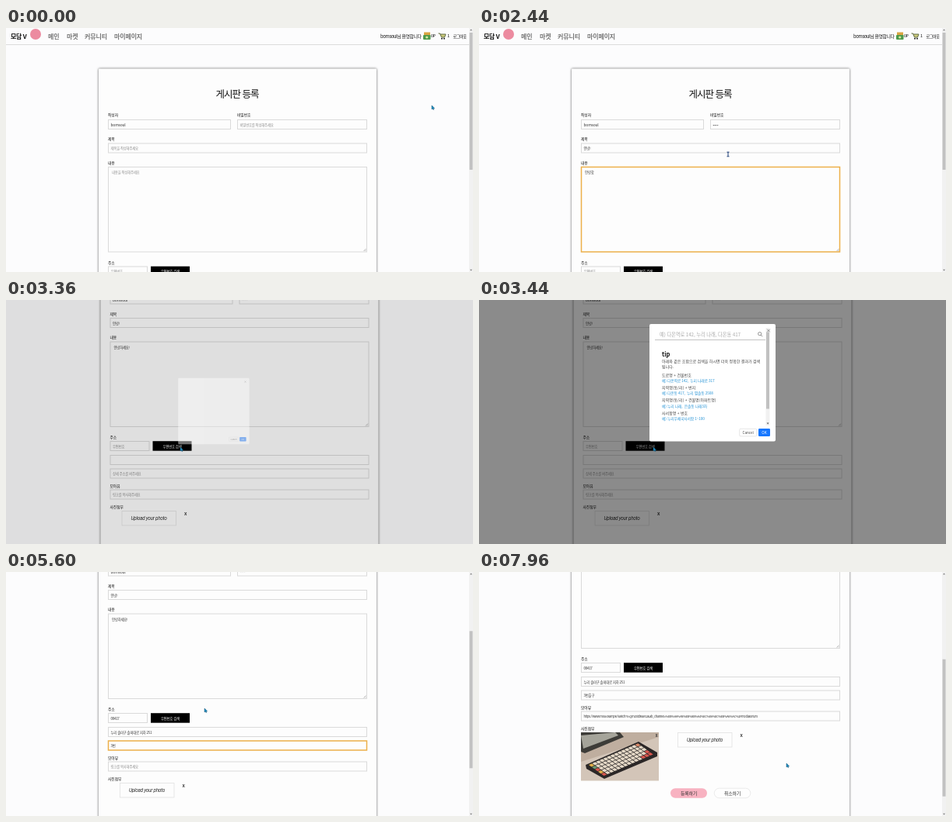
Write an HTML page that moves like this. It is 600 px wide and 315 px high and loops after 8000 ms.

```html
<!DOCTYPE html>
<html lang="ko">
<head>
<meta charset="utf-8">
<title>게시판 등록</title>
<style>
html, body { margin: 0; width: 100%; height: 100%; overflow: hidden; background: #fcfcfd; }
svg { display: block; width: 600px; height: 315px; }
text {
  font-family: "Noto Sans CJK KR", "Noto Sans CJK JP", "Noto Sans", sans-serif;
  font-size: 4.4px; letter-spacing: -.22px; fill: #333;
  dominant-baseline: central; white-space: pre;
}
.nav text { font-size: 8px; font-weight: 700; letter-spacing: -.15px; fill: #777; }
.nav .brand { fill: #111; letter-spacing: -.4px; }
.user text { font-size: 5.4px; fill: #111; letter-spacing: -.5px; }
.label text { font-size: 4.8px; font-weight: 500; letter-spacing: -.05px; fill: #111; }
.field { fill: #fdfdfd; stroke: #dadada; stroke-width: 1; }
.field.focus { stroke: #edb04a; stroke-width: 1.5; }
text.hint { fill: #8f8f8f; }
.mid { text-anchor: middle; }
#pass:not(.hint) { letter-spacing: .3px; }
#link:not(.hint) { font-size: 4px; letter-spacing: -.32px; }
#card { fill: #fdfdfd; filter: drop-shadow(0 0 1.6px #555); }
#modal text { font-size: 5px; letter-spacing: 0; fill: #444; }
#modal .blue { font-size: 4.8px; letter-spacing: -.15px; fill: #2a95d6; }
#modal .search { font-size: 6.3px; letter-spacing: -.1px; }
#modal .red { font-size: 5.6px; letter-spacing: -.1px; fill: #f0455a; }
#modal .small { font-size: 4.1px; fill: #888; }
#modal .row { letter-spacing: -.12px; }
#modal .tag { font-size: 3.6px; fill: #3a9bd8; letter-spacing: -.1px; }
.link { text-decoration: underline; fill: #2a95d6; }
.tagbox { fill: none; stroke: #b9dcf0; stroke-width: .5; }
.rule { stroke: #e2e2e2; stroke-width: .6; }
.off { display: none; }
</style>
</head>
<body>
<svg viewBox="0 0 600 315">
  <rect width="600" height="315" fill="#fcfcfd"/>

  <g id="page">
    <path d="M-5 21.5H605" stroke="#dcdcdc"/>
    <g class="nav">
      <text class="brand" x="6" y="10">모담 V</text>
      <circle cx="38" cy="8" r="7" fill="#ec8ba0"/>
      <text x="54" y="10">메인</text>
      <text x="78" y="10">마켓</text>
      <text x="101" y="10">커뮤니티</text>
      <text x="139" y="10">마이페이지</text>
    </g>
    <g class="user">
      <text x="481" y="10" style="font-size:6px">bomsoul님 환영합니다</text>
      <rect x="537" y="5.5" width="8" height="4" fill="#d9a441"/>
      <rect x="536" y="9" width="9.5" height="6" rx="1" fill="#4f9a4b"/>
      <circle cx="540.7" cy="12" r="1.6" fill="#d8e8a0"/>
      <text x="546" y="10">0P</text>
      <path d="M555.5 7h2l2 5h4l1.5-4h-7" fill="#c9c77a" stroke="#55633a" stroke-width=".9"/>
      <circle cx="560" cy="13.7" r=".9"/><circle cx="563" cy="13.7" r=".9"/>
      <text x="567" y="10">1</text>
      <text x="574.5" y="10" style="font-size:5.2px">로그아웃</text>
    </g>

    <rect id="card" x="119" y="52.5" width="357" height="520" rx="1"/>
    <text class="mid" x="297" y="84" style="font-size:12.5px;letter-spacing:-1px;fill:#111">게시판 등록</text>

    <g class="label">
      <text x="131" y="111.5">작성자</text>
      <text x="297" y="111.5">비밀번호</text>
      <text x="131" y="142.5">제목</text>
      <text x="131" y="173">내용</text>
      <text x="131" y="302">주소</text>
      <text x="131" y="364.5">모아뷰</text>
      <text x="131" y="392">사진첨부</text>
    </g>

    <rect class="field" x="131.5" y="118.5" width="157" height="12"/>
    <text x="134.5" y="124.5" style="font-size:5px">bomsoul</text>
    <rect class="field" x="297.5" y="118.5" width="166" height="12"/>
    <text id="pass" x="300.5" y="124.5"></text>
    <rect class="field" id="titleBox" x="131.5" y="149" width="332" height="12"/>
    <text id="subject" x="134.5" y="155"></text>
    <rect class="field" id="bodyBox" x="131.5" y="179.5" width="332" height="109.5"/>
    <path d="M459.5 288l3-3M461.3 288l1.2-1.2" stroke="#777" stroke-width=".5"/>
    <text id="content" x="136" y="186"></text>

    <rect class="field" x="131.5" y="308" width="50" height="12"/>
    <text id="zip" x="134.5" y="314"></text>
    <rect x="186" y="307.7" width="50" height="12.5"/>
    <text class="mid" x="211" y="314" style="fill:#fff">우편번호 검색</text>
    <rect class="field" x="131.5" y="326" width="332" height="12"/>
    <text id="address" x="134.5" y="332"></text>
    <rect class="field" id="detailBox" x="131.5" y="343.5" width="332" height="12"/>
    <text id="detail" x="134.5" y="349.5"></text>
    <rect class="field" id="linkBox" x="131.5" y="370.5" width="332" height="12"/>
    <text id="link" x="134.5" y="376.5"></text>

    <g id="photo">
      <svg x="131" y="397.5" width="100" height="62.5" viewBox="0 0 100 62.5">
        <rect width="100" height="62.5" fill="#bfae9f"/>
        <path d="M0 38L100 6V62.5H0z" fill="#d3c5b8"/>
        <path d="M0 0H50L55 6L5 27L0 25z" fill="#3d3c38"/>
        <path d="M0 4L44 0L48 4L3 21z" fill="#a5a49a"/>
        <path d="M6 42L74 12L98 26V31L30 60L7 47z" fill="#2b2727"/>
        <g id="keys" transform="matrix(64 -28 20 14.5 10 42)"></g>
      </svg>
      <text class="mid" x="228" y="401.5" style="font-weight:700">X</text>
    </g>
    <g id="upload">
      <rect id="uploadBox" x="146.5" y="398" width="69.5" height="18.5" stroke="#e2e2e2" stroke-width=".8"/>
      <text id="uploadText" class="mid" x="181" y="407.3" style="font:italic 6.5px Roboto,sans-serif;letter-spacing:-.3px">Upload your photo</text>
      <text class="mid" x="228" y="401.5" style="font-weight:700;font-size:5.4px">X</text>
    </g>
    <rect x="246" y="469.7" width="47" height="12.5" rx="6.2" fill="#f8b2c1"/>
    <rect x="302.3" y="469.7" width="46.5" height="12.5" rx="6.2" fill="#fefefe" stroke="#e2e2e2" stroke-width=".7"/>
    <text class="mid" x="269.5" y="475.7" style="font-size:6px">등록하기</text>
    <text class="mid" x="325.5" y="475.7" style="font-size:6px">취소하기</text>
  </g>

  <g id="bar">
    <rect x="595" width="5" height="315" fill="#f1f1f1"/>
    <path d="M596 3.3l1.5-1.8 1.5 1.8zM596 311.7l1.5 1.8 1.5-1.8z" fill="#777"/>
    <rect id="thumb" x="595.5" width="4" height="177" fill="#c1c1c1"/>
  </g>

  <rect id="mask" width="600" height="315"/>

  <g id="modal">
    <rect x="219" y="31" width="162" height="151.5" rx="2" fill="#fff"/>
    <g id="frame">
      <rect x="368.5" y="36" width="5" height="126" fill="#f1f1f1"/>
      <path d="M369.7 158.6l1.4 1.8 1.4-1.8z" fill="#555"/>
      <rect id="innerThumb" x="369" y="41.5" width="4" fill="#c1c1c1"/>
      <text id="query" class="search" x="232" y="44.3"></text>
      <g fill="none" stroke="#777" stroke-width=".8">
        <circle cx="360.7" cy="43.6" r="2.1"/><path d="M362.2 45.2l2 2"/>
      </g>
      <path d="M226 51.5H368" stroke="#aaa" stroke-width=".7"/>

      <g id="tips">
        <text x="235" y="69" style="font-size:7.5px;font-weight:700;fill:#111">tip</text>
        <text x="235" y="78">아래와 같은 조합으로 검색을 하시면 더욱 정확한 결과가 검색</text>
        <text x="235" y="85">됩니다.</text>
        <text x="235" y="96">도로명 + 건물번호</text>
        <text class="blue" x="235" y="103.5">예) 다온역로 142,  누리 나래로 317</text>
        <text x="235" y="112.3">지역명(동/리) + 번지</text>
        <text class="blue" x="235" y="119.8">예) 다온동 417,  누리 별솔동 2508</text>
        <text x="235" y="128.5">지역명(동/리) + 건물명(아파트명)</text>
        <text class="blue" x="235" y="136">예) 누리 나래,  은솔동 나래3차</text>
        <text x="235" y="145">사서함명 + 번호</text>
        <text class="blue" x="235" y="152.7">예) 누리우체국사서함 1~100</text>
      </g>

      <g id="results">
        <path d="M350.8 42.2l3.4 3.4m0-3.4l-3.4 3.4" stroke="#555" stroke-width=".7"/>
        <text x="230.5" y="59" style="letter-spacing:-.22px"><tspan font-weight="700">검색결과가 많습니다.</tspan> 검색어에 아래와 같은 조합을 이용하시면 더욱 정확</text>
        <text x="230.5" y="66" style="letter-spacing:-.22px">한 결과가 검색됩니다.  <tspan class="link">도로명+건물번호</tspan>,  <tspan class="link">지역명+지번</tspan>,  <tspan class="link">지역명+건물</tspan></text>
        <text x="230.5" y="73" style="letter-spacing:-.22px"><tspan class="link">명(아파트명)</tspan>,  <tspan class="link">사서함명+번호</tspan></text>
        <rect x="226" y="79" width="142" height="83" fill="#e6e6e8"/>
        <rect x="230" y="83" width="135" height="79" fill="#fff"/>
        <text x="234" y="90">도로명 전체</text>
        <text x="267" y="90">지역명 전체</text>
        <path d="M259.5 94h2.4l-1.2 1.6zM292.3 94h2.4l-1.2 1.6z" fill="#333"/>
        <path class="rule" d="M230 97.5H365M230 141H365"/>
        <text class="red" x="234" y="105.5">00583</text>
        <text class="small" x="331" y="106">영문보기  |  지도</text>
        <rect class="tagbox" x="233.5" y="110.5" width="12" height="5.6"/>
        <text class="tag" x="234.7" y="113.3">도로명</text>
        <text class="row" x="248" y="113.5">누리 솔미구 솔미대로 714 (솔미역 라온빌)</text>
        <rect class="tagbox" x="233.5" y="119.2" width="12" height="5.6"/>
        <text class="tag" x="236.2" y="122">지번</text>
        <text class="row" x="248" y="122.2">누리 솔미구 별솔동 605-8</text>
        <text class="small" x="248" y="131.5">+  이 지번주소 8건</text>
        <rect x="281" y="129" width="14" height="5" rx="2.5" fill="#888"/>
        <text x="283" y="131.5" style="font-size:3.6px;fill:#fff">더보기</text>
        <text class="red" x="234" y="149.5">00417</text>
        <text class="small" x="331" y="150">영문보기  |  지도</text>
        <rect class="tagbox" x="233.5" y="154.2" width="12" height="5.6"/>
        <text class="tag" x="234.7" y="157">도로명</text>
        <text class="row" x="248" y="157.2">누리 솔미구 솔미대로 지하 251 (솔미역)</text>
      </g>
    </g>
    <path d="M370.2 37.7l3.6 3.6m0-3.6l-3.6 3.6" stroke="#666" stroke-width=".7"/>
    <rect x="334.7" y="166.3" width="22" height="9.6" rx="1.3" fill="#fff" stroke="#d5d5d5" stroke-width=".6"/>
    <text class="mid" x="345.7" y="171" style="font-size:4.6px">Cancel</text>
    <rect x="359" y="166" width="15" height="10" rx="1.3" fill="#1677ff"/>
    <text class="mid" x="366.5" y="171" style="font-size:4.6px;fill:#fff">OK</text>
  </g>

  <g id="cursor">
    <path id="arrow" d="M0 0V5L1.2 4L2 5.6L2.9 5.1L2.2 3.7L3.6 3.5z" fill="#1b8fc4" stroke="#1d5574" stroke-width=".5"/>
    <path id="beam" d="M-1.5-2.8H1.5M0-2.8V2.8M-1.5 2.8H1.5" fill="none" stroke="#1e3f78" stroke-width="1"/>
    <path id="hand" d="M-.8 0Q0-1 .8 0V2.4L3.6 3.2V5.6L2.6 7.4H-.8L-2.6 4.4L-.8 4.6z" fill="#1583b5" stroke="#173a52" stroke-width=".6"/>
  </g>
</svg>

<script>
const LOOP = 8000;
const $ = id => document.getElementById(id);
const within = (t, a, b) => t >= a && t < b;
const clamp = v => Math.min(1, Math.max(0, v));
const show = (id, on) => $(id).classList.toggle('off', !on);

// keys: [time, ...values]; eased between neighbours
function track(keys, t) {
  let i = keys.findIndex(k => k[0] > t);
  if (i < 0) return keys.at(-1).slice(1);
  if (i === 0) return keys[0].slice(1);
  const [a, b] = [keys[i - 1], keys[i]];
  const p = (t - a[0]) / (b[0] - a[0]);
  const e = p * p * (3 - 2 * p);
  return a.slice(1).map((v, n) => v + (b[n + 1] - v) * e);
}

// Evenly spaced key strokes from start to end
const strokes = (start, end, words) => {
  const list = words.split(' ');
  return list.map((w, i) => [start + (end - start) * i / Math.max(1, list.length - 1), w]);
};
const typed = (keys, t) => keys.reduce((text, [at, w]) => t >= at ? w : text, '');

const pointer = [
  [40, 547, 100], [280, 320, 127], [840, 320, 127], [1220, 320, 163],
  [3000, 320, 163], [3240, 224, 190], [3450, 224, 190], [3640, 258, 44],
  [4600, 258, 44], [4960, 260, 169], [5060, 260, 169], [5140, 262, 157],
  [5190, 262, 157], [5320, 240, 222], [5400, 255, 176], [6080, 255, 176],
  [6240, 250, 251], [6400, 250, 251], [6600, 190, 278], [6900, 190, 278],
  [7240, 370, 40], [7440, 370, 44], [7720, 340, 200], [7920, 395, 247]
];
const scroll = [[2920, 0], [3120, 125.5], [7780, 125.5], [7940, 190.5]];
const OPEN = 3333, CLOSE = 5190, FADE = 107;

const fields = {
  pass: [strokes(520, 760, '• •• ••• ••••'), '비밀번호를 작성해주세요'],
  subject: [strokes(1400, 1720, 'ㅇ 아 안 안ㄴ 안녀 안녕 안녕!'), '제목을 작성해주세요'],
  content: [[...strokes(1840, 2200, 'ㅇ 아 안 안ㄴ 안녀 안녕'),
    ...strokes(2260, 2600, '안녕ㅎ 안녕하 안녕핫 안녕하세 안녕하셍 안녕하세요'),
    [2760, '안녕하세요!']], '내용을 작성해주세요'],
  zip: [[[CLOSE, '00417']], '우편번호'],
  address: [[[CLOSE, '누리 솔미구 솔미대로 지하 251']], ''],
  detail: [[...strokes(5480, 5600, '3 3ㅂ 3번'),
    ...strokes(5760, 5920, '3번추 3번출 3번출ㄱ 3번출구')], '상세 주소를 써주세요'],
  link: [[[6340, 'https://www.moa.example/watch?v=QmZ4tdRavo2&ab_channel=' +
    encodeURIComponent('모다소리/') + 'modasorium']], '링크를 복사해주세요'],
  query: [strokes(3760, 4400, 'ㅅ 소 솔 솔ㅁ 솔미 솔미ㅇ 솔미여 솔미역'),
    '예) 다온역로 142, 누리 나래, 다온동 417']
};

const focus = {
  titleBox: [1040, 1800], bodyBox: [1800, 3240],
  detailBox: [5330, 6220], linkBox: [6220, 7780]
};

function drawKeys() {
  const tones = { 0: '#e2b04a', 14: '#6d9a72', 28: '#d9584f', 42: '#e2b04a', 56: '#d9584f', 13: '#d98a6a', 55: '#d9584f', 67: '#d9584f', 68: '#d9584f', 69: '#d9584f' };
  for (let i = 0; i < 70; i++) {
    const key = document.createElementNS('http://www.w3.org/2000/svg', 'rect');
    const box = { x: i % 14 / 14, y: Math.floor(i / 14) / 5, width: .06, height: .17, fill: tones[i] || '#e6dac8' };
    for (const name in box) key.setAttribute(name, box[name]);
    $('keys').append(key);
  }
}

function render(t) {
  const locked = within(t, OPEN, CLOSE + FADE);
  const [y] = track(scroll, t);
  $('page').setAttribute('transform', `translate(${locked ? 2.5 : 0} ${-y})`);
  show('bar', !locked);
  $('thumb').setAttribute('y', 6 + y * .56);

  for (const id in fields) {
    const [keys, hint] = fields[id];
    const value = typed(keys, t);
    $(id).textContent = value || hint;
    $(id).classList.toggle('hint', !value);
  }
  $('query').style.fill = t < 3760 ? '#aaa' : '#333';
  for (const id in focus) $(id).classList.toggle('focus', within(t, ...focus[id]));

  // Dialog grows out of the pressed button
  const fade = clamp((t - OPEN) / FADE) * clamp(1 - (t - CLOSE) / FADE);
  const zoom = 1 - (1 - fade) ** 2;
  const size = .2 + .8 * zoom;
  $('mask').setAttribute('opacity', .45 * fade);
  $('modal').setAttribute('opacity', zoom);
  $('modal').setAttribute('transform', `translate(224 191) scale(${size}) translate(-224 -191)`);
  show('modal', locked);
  show('frame', within(t, 3420, CLOSE));
  const found = t >= 4480;
  show('tips', !found);
  show('results', found);
  $('innerThumb').setAttribute('height', found ? 20 : 99);

  const hover = within(t, 6560, 6990);
  $('uploadBox').setAttribute('fill', hover ? '#f8a4ad' : '#fdfdfd');
  $('uploadText').style.fill = hover ? '#fde3e6' : '#333';
  const added = t >= 7760;
  show('photo', added);
  $('upload').setAttribute('transform', `translate(${added ? 109 : 0} 0)`);

  const beam = within(t, 240, 3060) || within(t, 3600, 4680) || within(t, 5290, 5350) || within(t, 6200, 6460);
  show('beam', beam);
  show('hand', hover);
  show('arrow', !beam && !hover);
  $('cursor').setAttribute('transform', `translate(${track(pointer, t)})`);
}

drawKeys();
const start = performance.now();
function tick() {
  render((performance.now() - start) % LOOP);
  requestAnimationFrame(tick);
}
tick();
</script>
</body>
</html>
```
